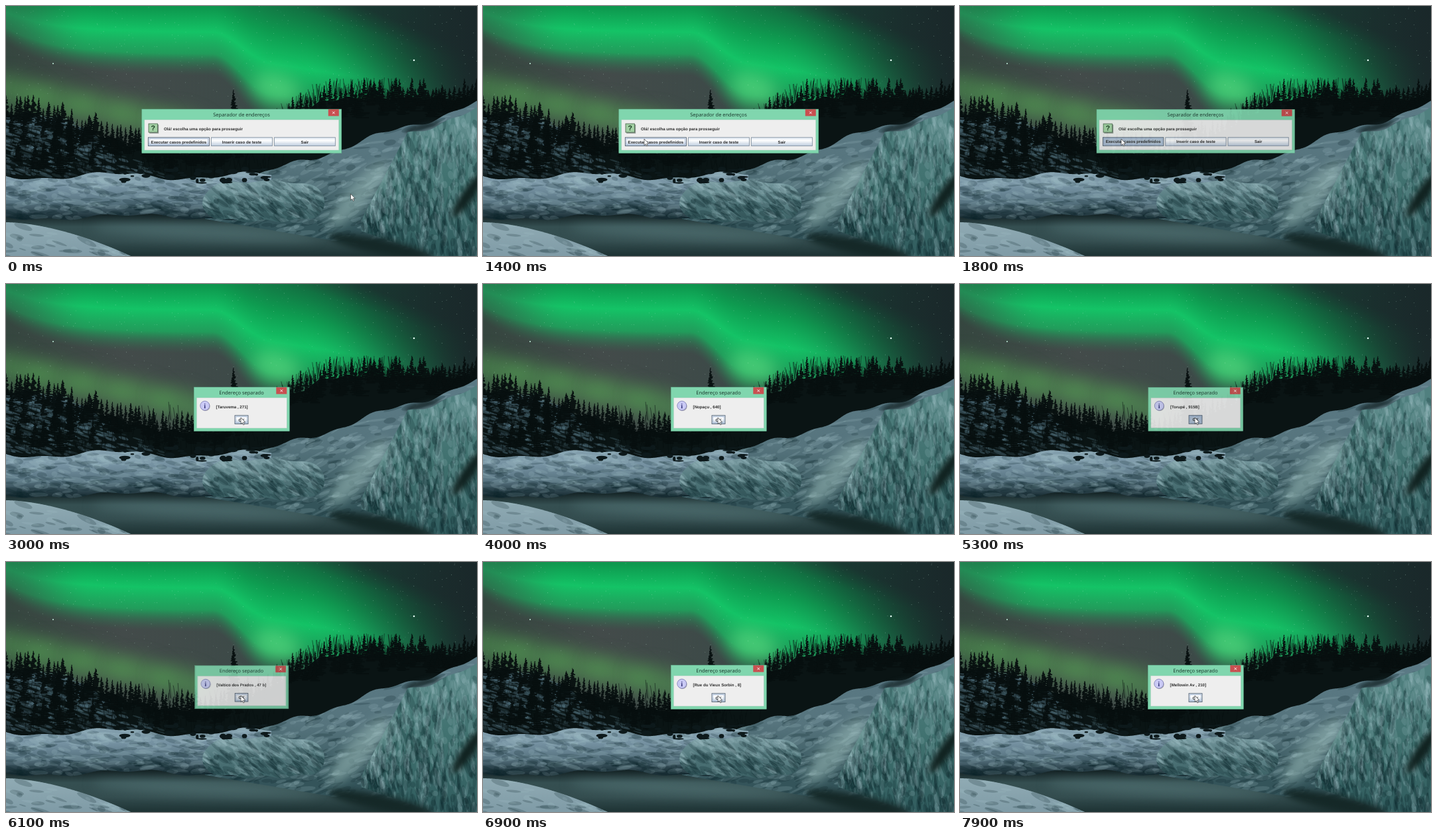
An HTML page with a canvas for the animation above (8 s loop, 710 by 378 pixels).

```html
<!DOCTYPE html>
<html lang="pt">
<head>
<meta charset="utf-8">
<style>
  html, body { margin: 0; width: 710px; height: 378px; overflow: hidden; background: #0b1618; }
  canvas, svg { position: absolute; left: 0; top: 0; }
  svg { text-rendering: geometricPrecision; }
  text { font: bold 6.15px "Liberation Sans", sans-serif; fill: #2e2e2e; }
  .title { font: 7.5px "Open Sans", sans-serif; fill: #17352a; }
  .mid { text-anchor: middle; }
  .ask { font-size: 10.5px; fill: #173a1e; }
  .info { font: bold 10.5px "Liberation Serif", serif; fill: #35357a; }
</style>
</head>
<body>
<canvas id="scene" width="710" height="378"></canvas>
<svg id="ui" width="710" height="378"></svg>
<script>
const W = 710, H = 378;
const ctx = document.getElementById('scene').getContext('2d');
const ui = document.getElementById('ui');
const { sin, exp, max, sqrt } = Math;
const clamp = v => Math.min(1, max(0, v));
const smooth = v => (v = clamp(v), v * v * (3 - 2 * v));
const mix = (a, b, k) => a + (b - a) * k;

let seed = 7;
const rnd = (a = 0, b = 1) => {
  seed = (seed * 1664525 + 1013904223) % 4294967296;
  return mix(a, b, seed / 4294967296);
};

function oval(color, blur, x, y, rx, ry, angle = 0) {
  ctx.filter = blur ? `blur(${blur}px)` : 'none';
  ctx.fillStyle = color;
  ctx.beginPath();
  ctx.ellipse(x, y, rx, ry, angle, 0, 7);
  ctx.fill();
  ctx.filter = 'none';
}

function fade(x0, y0, x1, y1, ...colors) {
  const g = ctx.createLinearGradient(x0, y0, x1, y1);
  colors.forEach((c, i) => g.addColorStop(i / (colors.length - 1), c));
  return g;
}

// Fills the area between two curves and mottles it: lighter on top, darker below
function land(x0, x1, top, bottom, fill, angle = 0, marks = 0) {
  ctx.save();
  ctx.fillStyle = fill;
  ctx.beginPath();
  for (let x = x0; x <= x1; x++) ctx.lineTo(x, top(x));
  for (let x = x1; x >= x0; x--) ctx.lineTo(x, bottom(x));
  ctx.fill();
  ctx.clip();
  for (let i = 0; i < marks; i++) {
    const x = rnd(x0, x1), depth = rnd();
    const color = rnd() > mix(0.3, 0.7, depth) ? 'rgba(165,198,204,.16)' : 'rgba(8,30,38,.2)';
    oval(color, 0, x, mix(top(x), bottom(x), depth), rnd(4, 17), rnd(1, 4.5), angle + rnd(-0.3, 0.3));
  }
  ctx.restore();
}

function drawSky() {
  ctx.fillStyle = fade(0, 0, W, 0, '#35463f', '#434b4a', '#3d4a48', '#1c2e2f', '#1a282a');
  ctx.fillRect(0, 0, W, H);
  for (let i = 0; i < 5; i++) oval('rgba(84,160,84,.55)', 13, 20 + 62 * i, 130 + 13 * i, 48, 22, 0.3);
  for (let x = 0; x < W; x++) {
    const crest = max(-30, (x - 460) * 0.4) - 30;
    const edge = 56 + 50 * (1 - exp(-x / 70)) + 75 * smooth((x - 310) / 90);
    ctx.globalAlpha = mix(0.55, 1, smooth(x / 130)) * (1 - smooth((x - 450) / 270));
    ctx.fillStyle = fade(0, crest, 0, edge, 'rgba(14,100,58,.25)', 'rgba(13,125,68,.85)', 'rgb(14,155,80)', 'rgb(20,195,102)', 'rgba(28,170,94,.85)', 'rgba(50,110,80,0)');
    ctx.fillRect(x, 0, 1, edge);
  }
  ctx.globalAlpha = 1;
  oval('rgba(84,215,126,.75)', 13, 408, 125, 36, 22, 0.3);
  for (let i = 0; i < 350; i++) oval(`rgba(200,240,220,${rnd(0.1, 0.5)})`, 0, rnd(0, W), rnd(0, 140), 0.5, 0.5);
  oval('#e6fff6', 0, 615, 82, 1.3, 1.3);
  oval('#c5f0dc', 0, 71, 87, 1, 1);
}

const skyline = x => x < 338
  ? 137 + 63 * smooth(x / 270)
  : 116 + 68 * (1 - smooth((x - 345) / 160));

function spruce(x, top, height, width) {
  ctx.fillStyle = '#070f0f';
  for (let y = 0; y < height; y += 1.5) {
    const reach = 0.6 + width * y / height;
    ctx.fillRect(x - reach * rnd(0.4, 1.1), top + y, reach * rnd(1, 2), 1.7);
  }
}

function drawForest() {
  land(0, W, x => skyline(x) + 24 + 3 * sin(x / 7), () => 290, '#0a1414');
  for (let i = 0; i < 420; i++) {
    const y = rnd(168, 258), x = rnd(-5, 70 + (y - 160) * 1.8);
    oval(`rgba(84,116,130,${rnd(0.1, 0.5)})`, 0, x, y, rnd(2, 12), rnd(0.7, 2.5), 0.3);
  }
  for (let x = 0; x < W; x += rnd(4, 9)) {
    const size = x > 500 ? 1.35 : 1;
    spruce(x, skyline(x) + rnd(-9, 12), rnd(30, 45), rnd(5, 9) * size);
  }
  spruce(343, 126, 80, 12);
  for (let i = 0; i < 14; i++) spruce(rnd(5, 210), rnd(160, 215), rnd(25, 45), rnd(7, 14));
  ctx.strokeStyle = 'rgba(8,15,15,.7)';
  ctx.lineWidth = 0.7;
  ctx.beginPath();
  for (let i = 0; i < 420; i++) {
    const x = rnd(0, 590), foot = x < 420 ? rnd(205, 262) : skyline(x) + 20;
    ctx.moveTo(x, foot);
    ctx.lineTo(x + rnd(-6, 6), foot - rnd(8, 28));
  }
  ctx.stroke();
}

function drawGround() {
  const slope = x => 250 - 0.33 * (x - 400) + 4 * sin(x / 24) + 2 * sin(x / 9);
  const shore = x => 312 + 4 * sin(x / 40) + 2 * sin(x / 13);
  const bank = x => 257 + 5 * sin(x / 34) + 2 * sin(x / 12);
  const arch = x => sqrt(max(0, 1 - ((x - 388) / 92) ** 4));

  ctx.fillStyle = fade(0, 312, 0, H, '#0d191b', '#354f51', '#334c4e', '#1d3233');
  ctx.fillRect(0, 300, W, 78);
  oval('rgba(94,128,130,.6)', 9, 300, 342, 170, 9, 0.04);

  land(300, W, slope, x => 322 + 0.17 * (x - 300), fade(0, 160, 0, 330, '#5b7a85', '#56747d', '#34545a'), -0.3, 520);
  oval('#142426', 3, 628, 183, 28, 4, -0.25);
  land(535, W, x => max(slope(x) + 10, 325 - 1.9 * (x - 535)), x => 340 + 0.35 * (x - 535),
    fade(0, 170, 0, 378, '#50807f', '#3f706e', '#315c5e'), 1.5, 750);
  oval('#10211f', 4, 697, 285, 9, 42, 0.6);
  oval('#152827', 5, 565, 364, 80, 12, 0.2);
  oval('rgba(150,184,182,.6)', 8, 532, 285, 66, 17, -0.85);

  land(0, 400, bank, x => shore(x) + 7, fade(0, 252, 0, 320, '#84a0ae', '#7490a0', '#577380', '#1b2f36'), 0.1, 420);
  land(296, 480, x => 297 - 32 * arch(x) + 2 * sin(x / 11), x => 300 + 25 * arch(x) + 2 * sin(x / 8),
    fade(0, 265, 0, 325, '#76989e', '#4f7579', '#3d6266'), 0.6, 240);
  for (let i = 0; i < 45; i++) oval('#0d191b', 0, rnd(170, 400), rnd(246, 268), rnd(2, 9), rnd(1, 4));

  land(0, 190, x => 327 + 51 * (x / 188) ** 1.7, () => H, fade(0, 327, 0, H, '#90abb4', '#7f9ba6'), 0.2, 40);
}

const rect = (x, y, w, h, fill, more = '') =>
  `<rect x="${x}" y="${y}" width="${w}" height="${h}" fill="${fill}" ${more}/>`;
const line = (color, width) => `stroke="${color}" stroke-width="${width}"`;
const label = (x, y, text, cls = 'mid') => `<text class="${cls}" x="${x}" y="${y}">${text}</text>`;
const ball = (x, y, more) => `<circle cx="${x}" cy="${y}" r="7" ${more}/>`;

const icons = {
  ask: rect(216.2, 179.2, 14, 13.5, '#8a938c') + rect(215, 178, 13.5, 13, '#a3d0a4', line('#456349', 0.8)) +
    label(221.8, 188.3, '?', 'mid ask'),
  info: ball(300.7, 185, 'fill="#a5a5ae"') + ball(299.8, 184, 'fill="#cacaf5" ' + line('#7c7cb4', 0.8)) +
    label(299.8, 187.6, 'i', 'mid info')
};

// Buttons share one row; the first one has the focus
const button = (text, i, x, w) =>
  rect(x, 198.8, w, 12.7, 'url(#metal)', line(i ? '#8794a3' : '#4f5f72', 0.9) + (i ? '' : ' class="main"')) +
  (i ? '' : rect(x + 1.8, 200.6, w - 3.6, 9.1, 'none', line('#91a8cb', 0.6))) +
  label(x + w / 2, 207.5, text);

function dialog(width, title, icon, message, buttons, buttonX, buttonW) {
  const x = 355.3 - width / 2, right = x + width;
  return `<g class="dialog">` +
    rect(x, 156, width, 66.5, '#80d6ae', line('#62b08c', 0.5)) +
    rect(x + 4, 172, width - 8, 46, '#eee', line('#a5c9b8', 0.5)) +
    label(355, 166.7, title, 'title mid') +
    rect(right - 20, 156.2, 16, 10.2, '#c94f50') +
    `<path d="M${right - 13.8} 159.6l3.6 3.6m0-3.6l-3.6 3.6" ${line('#fff', 0.9)}/>` +
    icons[icon] + label(x + 33.3, 187.8, message, '') +
    buttons.map((text, i) => button(text, i, buttonX + 95 * i, buttonW)).join('') + '</g>';
}

const results = ['Taruvema , 271', 'Nopaçu , 640', 'Torupé , 915B', 'Lago Cinza , 47',
  'Valtico dos Prados , 47 b', 'Rue du Vieux Sorbin , 8', 'Mellowin Av , 210'];

ui.innerHTML = `<defs><linearGradient id="metal" x2="0" y2="1">
  <stop stop-color="#dce6f1"/><stop offset=".35" stop-color="#fff"/><stop offset="1" stop-color="#bccbdd"/>
  </linearGradient></defs>` +
  dialog(301, 'Separador de endereços', 'ask', 'Olá! escolha uma opção para prosseguir',
    ['Executar casos predefinidos', 'Inserir caso de teste', 'Sair'], 214.4, 92) +
  results.map(r => dialog(144, 'Endereço separado', 'info', `[${r}]`, ['OK'], 345, 20)).join('') +
  `<path id="cursor" d="M0 0V9.6L2.2 7.6L3.8 11L5.3 10.3L3.8 7H6.7Z" fill="#fff" ${line('#222', 0.6)}/>`;

const dialogs = [...ui.querySelectorAll('.dialog')];
const cursor = document.getElementById('cursor');
const clicks = [1700, 3600, 4500, 5200, 5900, 6600, 7400];

// Each dialog fades and grows in after one click, and out after the next
function showDialog(el, i, t) {
  const click = clicks[i] ?? Infinity;
  const opened = i ? clamp((t - clicks[i - 1] - 100) / 130) : 1;
  const closed = clamp((t - click - 80) / 200);
  const size = 0.92 + 0.08 * (opened - closed);
  el.setAttribute('opacity', opened * (1 - closed));
  el.setAttribute('transform', `translate(355 189) scale(${size}) translate(-355 -189)`);
  el.querySelector('.main').setAttribute('fill', t >= click - 100 ? '#b3c3d6' : 'url(#metal)');
}

function render(now) {
  const t = Math.floor(now % 8000 / 100) * 100;
  dialogs.forEach((el, i) => showDialog(el, i, t));
  const toMenu = smooth((t - 100) / 1200), toOk = smooth((t - 2100) / 800);
  cursor.setAttribute('transform',
    `translate(${mix(mix(519.5, 243, toMenu), 354, toOk)} ${mix(mix(284, 201, toMenu), 202, toOk)})`);
}

drawSky();
drawForest();
drawGround();
const start = performance.now();
(function frame() {
  render(performance.now() - start);
  requestAnimationFrame(frame);
})();
</script>
</body>
</html>
```
